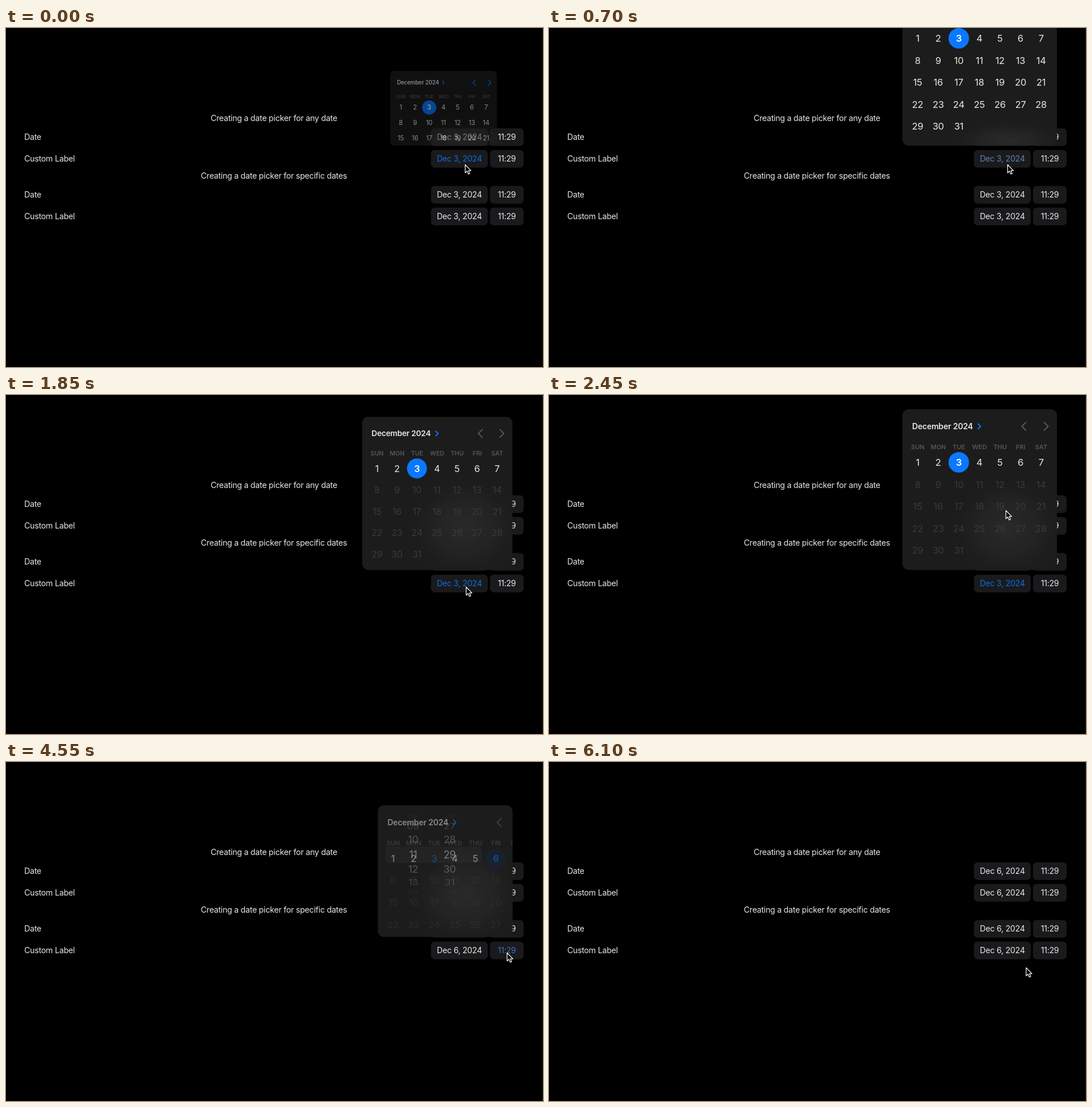
An HTML page for the animation above (6450 ms loop, 942 px wide and 594 px high).

```html
<!DOCTYPE html>
<html lang="en">
<head>
<meta charset="utf-8">
<title>Date pickers</title>
<style>
  html, body { margin: 0; width: 100%; height: 100%; overflow: hidden; background: #000; }
  svg { display: block; width: 942px; height: 594px; }
  text { font: 14.2px Inter, "Open Sans", sans-serif; letter-spacing: -.28px; fill: #e6e6e6; }
  .mid { text-anchor: middle; }
  .title { font-size: 14px; font-weight: 600; letter-spacing: -.2px; }
  .weekday { font-size: 11px; font-weight: 600; letter-spacing: 0; fill: #565659; }
  .day { font-size: 16.5px; letter-spacing: -.3px; }
  .wheel { font-size: 18px; letter-spacing: -.4px; }
  .chevron { fill: none; stroke-linecap: round; stroke-linejoin: round; }
</style>
</head>
<body>
<svg id="stage" viewBox="0 0 942 594">
  <defs>
    <clipPath id="clip"><rect id="clipBox"/></clipPath>
    <radialGradient id="glow">
      <stop offset="0" stop-color="#2a2a2a"/>
      <stop offset=".5" stop-color="#262626" stop-opacity=".7"/>
      <stop offset="1" stop-color="#1c1c1c" stop-opacity="0"/>
    </radialGradient>
  </defs>
</svg>
<script>
const LOOP = 6450, STEP = 50;
const WHITE = [230, 230, 230], BLUE = [12, 108, 222];
const ACCENT = '#0a78ff', TODAY = '#0c6fe0';
const stage = document.getElementById('stage');
const clipBox = document.getElementById('clipBox');

function set(node, attrs) {
  for (const key in attrs) node.setAttribute(key, attrs[key]);
  return node;
}
function add(parent, tag, attrs, content) {
  const node = set(document.createElementNS('http://www.w3.org/2000/svg', tag), attrs);
  if (content !== undefined) node.textContent = content;
  return parent.appendChild(node);
}
const show = (node, alpha) => node.setAttribute('opacity', alpha);
const clamp = v => Math.max(0, Math.min(1, v));
const mix = (a, b, p) => a + (b - a) * p;
const ramp = (t, start, span) => clamp((t - start) / span);

// Slightly underdamped spring from 0 to 1
function spring(ms) {
  if (ms <= 0) return 0;
  const zeta = .76, x = 16 * ms / 1000, root = Math.sqrt(1 - zeta * zeta);
  return 1 - Math.exp(-zeta * x) * (Math.cos(root * x) + zeta / root * Math.sin(root * x));
}

// Form rows
add(stage, 'rect', { x: 941, width: 1, height: 594, fill: '#1e1f1f' });
function heading(y, content) {
  add(stage, 'text', { class: 'mid', x: 470, y: y + 5 }, content);
}
function pill(x, width, y, content) {
  add(stage, 'rect', { x, y: y - 15.3, width, height: 31, rx: 6.5, fill: '#1a1a1c' });
  return add(stage, 'text', { class: 'mid', x: x + width / 2, y: y + 5 }, content);
}
function formRow(y, label) {
  add(stage, 'text', { x: 32, y: y + 5 }, label);
  return { date: pill(745.5, 99.5, y, 'Dec 3, 2024'), time: pill(849, 59, y, '11:29') };
}
heading(158, 'Creating a date picker for any date');
heading(259, 'Creating a date picker for specific dates');
const rows = [formRow(191, 'Date'), formRow(229, 'Custom Label'),
              formRow(292, 'Date'), formRow(330, 'Custom Label')];

// Popover
const popover = add(stage, 'g', { 'clip-path': 'url(#clip)' });
const panel = add(popover, 'rect', { x: 0, y: -100, width: 942, height: 594, fill: '#1c1c1c' });
const glow = add(popover, 'ellipse', { fill: 'url(#glow)' });
const content = add(popover, 'g', {});

function chevron(parent, x, y, size, dir, color, weight) {
  return add(parent, 'path', {
    class: 'chevron', stroke: color, 'stroke-width': weight,
    d: `M${x - dir * size / 2} ${y - size}l${dir * size} ${size}l${-dir * size} ${size}`
  });
}
const calendar = add(content, 'g', {});
add(calendar, 'text', { class: 'title', x: 17, y: 35 }, 'December 2024');
chevron(calendar, 135, 30, 4.3, 1, ACCENT, 2);
const arrows = [chevron(calendar, 213, 30, 7, -1, ACCENT, 2),
                chevron(calendar, 252, 30, 7, 1, ACCENT, 2)];
const column = i => 26.6 + 36.1 * i;
['SUN', 'MON', 'TUE', 'WED', 'THU', 'FRI', 'SAT'].forEach((name, i) =>
  add(calendar, 'text', { class: 'mid weekday', x: column(i) + .3, y: 70 }, name));
const todayDisc = add(calendar, 'circle', { cx: column(2), cy: 93, r: 18, fill: ACCENT });
const pickDisc = add(calendar, 'circle', { cx: column(5), cy: 93, r: 18, fill: '#16263a' });
const days = [];
for (let n = 1; n <= 31; n++) {
  const i = n - 1;
  days[n] = add(calendar, 'text', {
    class: 'mid day', x: column(i % 7), y: 99 + 38.6 * Math.floor(i / 7)
  }, n);
}

const wheels = add(content, 'g', {});
add(wheels, 'rect', { x: 14, y: 72, width: 169, height: 29, rx: 6, fill: '#fff', 'fill-opacity': .07 });
function wheel(x, value) {
  for (let k = -3; k <= 3; k++) {
    const angle = k * .341;
    const y = 86.5 + 77.7 * Math.sin(angle);
    add(wheels, 'text', {
      class: 'mid wheel', y: 6.5, opacity: [1, .62, .36, .1][Math.abs(k)],
      transform: `translate(${x} ${y}) scale(1 ${Math.cos(angle)})`
    }, String(value + k).padStart(2, '0'));
  }
}
wheel(62, 11);
wheel(126, 29);

// Pointer
const pointer = add(stage, 'path', {
  d: 'M0 0V14.2L3.3 11.2L5.6 16.4L8 15.4L5.8 10.3H10.2Z',
  fill: '#000', stroke: '#fff', 'stroke-width': 1.2, 'stroke-linejoin': 'round'
});
const path = [
  [0, 805.5, 239.5], [700, 804.5, 239.5], [1150, 805, 241], [1300, 807, 315], [1450, 811, 341.5],
  [1520, 812, 347], [1650, 808, 338], [1950, 807, 336], [2250, 803, 210], [2450, 801.5, 202.5],
  [2700, 802, 198], [3000, 824, 122], [3150, 824, 118], [3350, 825, 122], [3600, 827, 157.5],
  [3900, 848, 305], [4250, 882, 339], [4550, 879, 334.5], [5200, 879, 334], [5500, 876, 350],
  [5700, 858, 363], [5900, 841, 359], [6100, 837, 360.5], [LOOP, 837, 360.5]
];
function pointerAt(t) {
  const i = Math.max(1, path.findIndex(key => key[0] >= t));
  const [t0, x0, y0] = path[i - 1], [t1, x1, y1] = path[i];
  const p = ramp(t, t0, t1 - t0), e = p * p * (3 - 2 * p);
  return [mix(x0, x1, e), mix(y0, y1, e)];
}

// Popover schedule
const ANY = { open: -87, close: 700, x: 620, w: 271, h: 281, bottom: 206, anchor: 795 };
const LIMITED = { open: 1650, x: 620, w: 271, h: 281.5, bottom: 306.5, anchor: 795 };
const TIME = { close: 5700, x: 689, w: 197, h: 172.5, bottom: 306.5, anchor: 878 };
const SWITCH = 4463, PICK = 3150;

// Width shrinks to a part of the panel while height goes to zero
function grown(p, u) {
  const scale = .42 + .58 * u;
  return { x: p.anchor + (p.x - p.anchor) * scale, w: p.w * scale, h: p.h * u, scale, bottom: p.bottom };
}
function popoverAt(t) {
  const p = t < 1300 ? ANY : t < SWITCH ? LIMITED : TIME;
  if (p.close && t > p.close) {
    const ms = t - p.close;
    return { ...grown(p, Math.exp(-((ms / 150) ** 2))), alpha: 1 - ramp(ms, 0, 250) };
  }
  if (p === TIME) {
    const u = spring(t - SWITCH), blend = key => mix(LIMITED[key], TIME[key], u);
    return { x: blend('x'), w: blend('w'), h: blend('h'), bottom: p.bottom, scale: 1, alpha: 1 };
  }
  return { ...grown(p, spring(t - p.open)), alpha: ramp(t, p.open, 150) };
}

// Tint dips in brightness half way through a change
function tint(node, amount) {
  const dim = 1 - .25 * Math.sin(Math.PI * amount);
  node.style.fill = `rgb(${WHITE.map((c, i) => Math.round(mix(c, BLUE[i], amount) * dim))})`;
}

function drawCalendar(t) {
  const limited = t >= 1300, picked = ramp(t, PICK, 150);
  arrows.forEach(arrow => set(arrow, { stroke: limited ? '#58585b' : ACCENT }));
  show(todayDisc, 1 - picked);
  show(pickDisc, picked);
  for (let n = 1; n <= 31; n++) {
    const chosen = n === (picked > .5 ? 6 : 3);
    days[n].style.fill = limited && n > 7 ? '#39393b'
      : n === 3 ? (chosen ? '#fff' : TODAY)
      : chosen ? ACCENT : '#e8e8e8';
    days[n].style.fontWeight = chosen ? 600 : 400;
  }
}

function draw(t) {
  const box = popoverAt(t), top = box.bottom - box.h, limited = t >= 1300;
  show(popover, box.alpha);
  set(clipBox, { x: box.x, y: top, width: box.w, height: Math.max(0, box.h), rx: 11 * Math.min(1, box.scale) });
  set(content, { transform: `translate(${box.x} ${top}) scale(${box.scale})` });
  set(glow, { cx: 805, cy: limited ? 232 : 198, rx: 105, ry: limited ? 95 : 38 });
  const swap = ramp(t, SWITCH, 190);
  show(calendar, 1 - swap);
  show(wheels, swap);
  drawCalendar(t);

  const date = t < PICK + 50 ? 'Dec 3, 2024' : 'Dec 6, 2024';
  rows.forEach(row => { row.date.textContent = date; });
  tint(rows[1].date, 1 - ramp(t, 615, 160));
  tint(rows[3].date, ramp(t, 1600, 120) - ramp(t, 4390, 140));
  tint(rows[3].time, ramp(t, 4430, 160) - ramp(t, 5620, 160));

  set(pointer, { transform: `translate(${pointerAt(t)})` });
}

function tick() {
  draw(Math.floor(performance.now() % LOOP / STEP) * STEP);
  requestAnimationFrame(tick);
}
tick();
</script>
</body>
</html>
```
